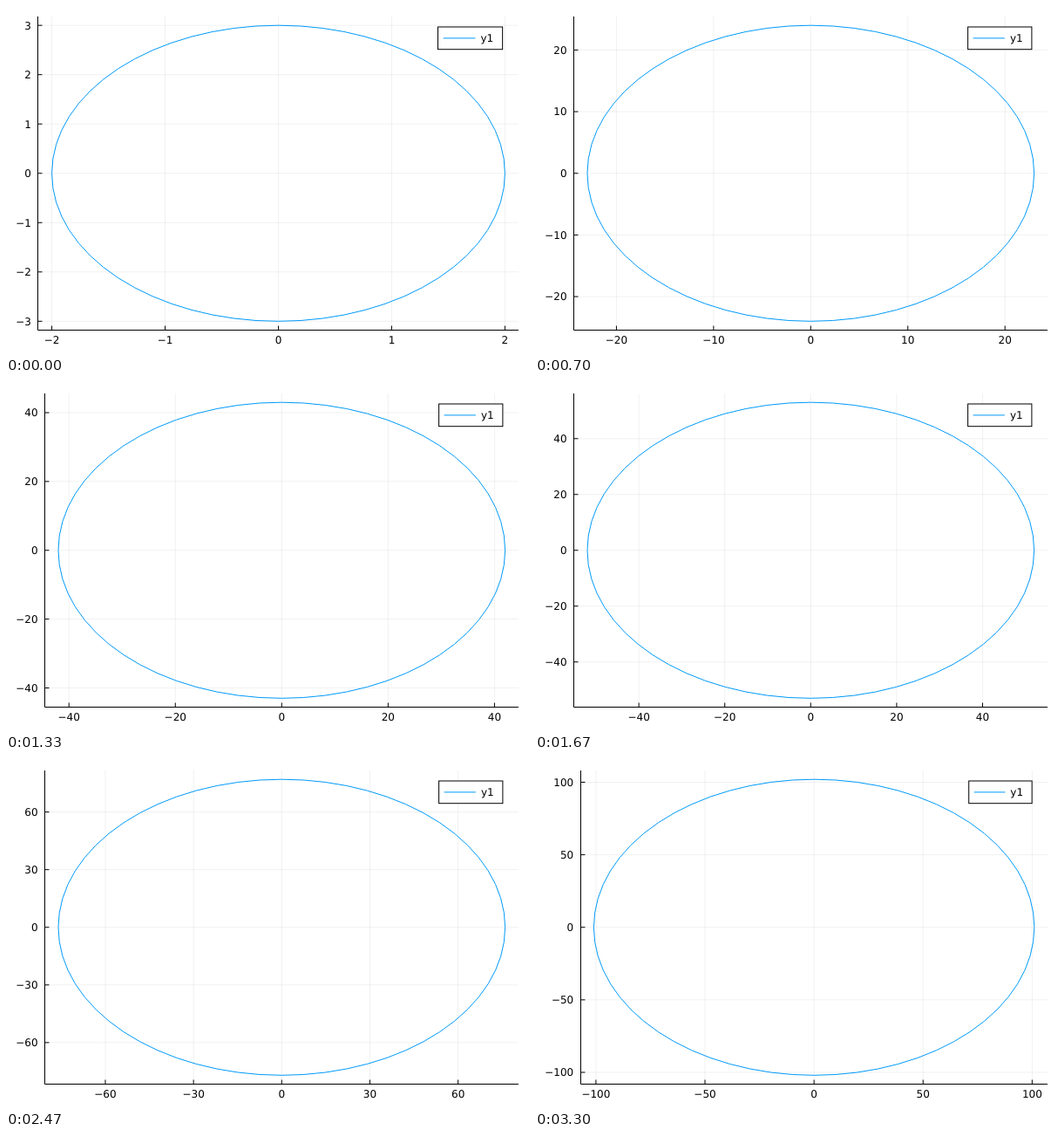
An HTML page for the animation above (3.33 s loop, 600 by 400 pixels).

```html
<!DOCTYPE html>
<html lang="en">
<head>
<meta charset="utf-8">
<title>Growing ellipse</title>
<style>
  html, body { margin: 0; width: 100%; height: 100%; overflow: hidden; background: #fff; }
  svg { display: block; }
  text { font: 12px "DejaVu Sans", sans-serif; text-rendering: geometricPrecision; }
  path, ellipse, rect { fill: none; stroke: #000; }
  rect { fill: #fff; }
  .grid { stroke: rgba(0, 0, 0, .06); }
  .curve { stroke: #009afa; }
  .mid { text-anchor: middle; }
  .end { text-anchor: end; }
</style>
</head>
<body>
<svg id="plot" width="600" height="400" viewBox="0 0 600 400"></svg>
<script>
const LOOP = 3330, EM = 12;
const RIGHT = 588, TOP = 12, BOTTOM = 371.5;
const NICE = [[1, 1], [5, .9], [2, .7], [2.5, .5], [3, .2]];
const GLYPH = { '\u2212': .838, '.': .318 };
const plot = document.getElementById('plot');

const textWidth = s => EM * [...s].reduce((w, c) => w + (GLYPH[c] || .636), 0);
const path = (cls, d) => `<path class="${cls}" d="${d}"/>`;
const text = (cls, x, y, s) => `<text class="${cls}" x="${x}" y="${y}">${s}</text>`;

// Best tick step for -lim..lim: weighs tick count, coverage and niceness
function ticks(lim) {
  let best = -Infinity, step = 1;
  for (let z = 0; z < 3; z++) {
    for (const [q, nice] of NICE) {
      const s = q * 10 ** z, n = 2 * Math.floor(lim / s) + 1;
      if (n < 4 || n > 8) continue;
      const score = .25 * (1 - Math.abs(n - 5) / 5) + lim / ((n - 1) * s) + .25 * nice;
      if (score > best) { best = score; step = s; }
    }
  }
  const m = Math.floor(lim / step), list = [];
  for (let k = -m; k <= m; k++) {
    const label = (k * step).toFixed(step % 1 ? 1 : 0).replace('-', '\u2212');
    list.push({ at: k * step / lim, label });
  }
  return list;
}

function legend(width) {
  const unit = width / 45, right = RIGHT - width / 30;
  const left = right - 5 * unit - 12.9;
  return `<rect x="${left}" y="24" width="${right - left}" height="25.7"/>` +
    path('curve', `M${left + unit / 2} 36.9h${3 * unit}`) +
    text('', left + 4 * unit, 41.3, 'y1');
}

function draw(i) {
  const xs = ticks((i + 2) * 1.06), ys = ticks((i + 3) * 1.06);
  const left = 19.3 + Math.max(...ys.map(t => textWidth(t.label)));
  const rx = (RIGHT - left) / 2, ry = (BOTTOM - TOP) / 2;
  const cx = left + rx, cy = TOP + ry;
  const axis = Math.floor(left) + .5;
  let grid = '', marks = `M${axis} ${TOP}V${BOTTOM}H${RIGHT}`, labels = '';
  for (const t of xs) {
    const x = cx + t.at * rx;
    grid += `M${x} ${TOP}V${BOTTOM}`;
    marks += `M${x} ${BOTTOM}v-5`;
    labels += text('mid', x, 386.8, t.label);
  }
  for (const t of ys) {
    const y = cy - t.at * ry;
    grid += `M${left} ${y}H${RIGHT}`;
    marks += `M${axis} ${y}h5`;
    labels += text('end', left - 8, y + 4.4, t.label);
  }
  plot.innerHTML = path('grid', grid) + path('', marks) + labels +
    `<ellipse class="curve" cx="${cx}" cy="${cy}" rx="${rx / 1.06}" ry="${ry / 1.06}"/>` +
    legend(RIGHT - left);
}

let shown = -1;
function tick() {
  // 30 steps per second, start times rounded to 10 ms
  const i = Math.floor((Math.floor(performance.now() % LOOP / 10) + .5) * .3);
  if (i !== shown) draw(shown = i);
  requestAnimationFrame(tick);
}
tick();
</script>
</body>
</html>
```
